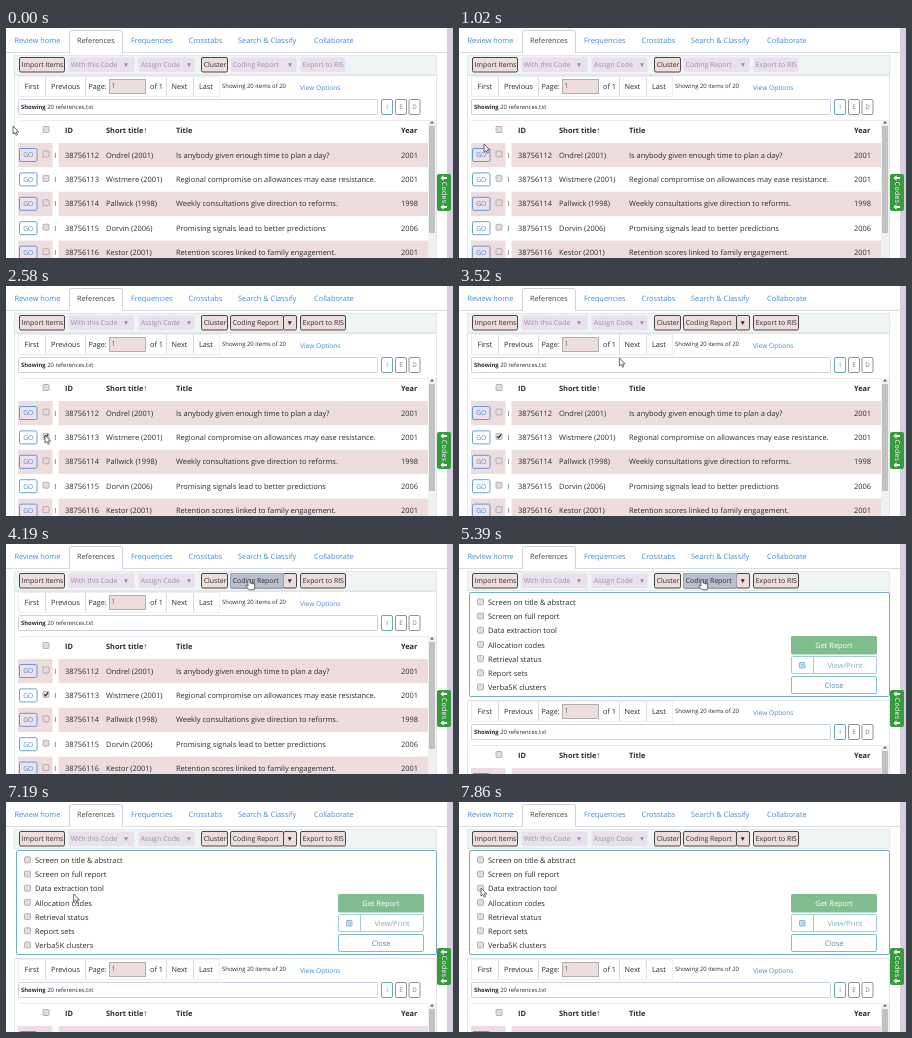
Animation, 447 px wide and 230 px high, one loop 8 s. Source, as an HTML page:

```html
<!DOCTYPE html>
<html lang="en">
<head>
<meta charset="utf-8">
<title>Reference list</title>
<style>
  html, body { margin: 0; width: 100%; height: 100%; overflow: hidden; background: #fff; }
  svg { display: block; width: 447px; height: 230px; }
  text { font-family: "Open Sans", "Noto Sans", sans-serif; text-rendering: geometricPrecision; white-space: pre; }
</style>
</head>
<body>
<svg id="stage" viewBox="0 0 447 230"></svg>
<script>
const INK = '#2b2b2e', EDGE = '#4a4648', BLUE = '#4487dc', PINK = '#eedddd', PALE = '#ebe0ee', MUTED = '#9b90a6', LINE = '#d9dbe0';
const LOOP = 8000, SHIFT = 109;

// Drawing helpers; text is placed by its vertical centre
const text = (x, y, s, size = 7.45, fill = INK, more = '') =>
  `<text x="${x}" y="${y + size * 0.35}" font-size="${size}" fill="${fill}" ${more}>${s}</text>`;
const mid = (x, y, s, size, fill, more = '') => text(x, y, s, size, fill, 'text-anchor="middle" ' + more);
const box = (x1, y1, x2, y2, fill, stroke = 'none', r = 0, more = '') =>
  `<rect x="${x1}" y="${y1}" width="${x2 - x1}" height="${y2 - y1}" fill="${fill}" stroke="${stroke}" rx="${r}" ${more}/>`;
const path = (d, fill, stroke = 'none', more = '') => `<path d="${d}" fill="${fill}" stroke="${stroke}" ${more}/>`;
const group = (id, inner, more = '') => `<g id="${id}" ${more}>${inner}</g>`;
const down = (x, fill) => path(`M${x - 2} 35.2h4l-2 3.8z`, fill);
const check = (x, y) => box(x - 3, y - 3, x + 3, y + 3, '#e5dae0', '#aba1ab', 1, 'stroke-width=".8"');
const tool = (x1, x2, label, on) =>
  box(x1 + .5, 29.5, x2 - .5, 44, on ? PINK : PALE, on ? EDGE : 'none', 1.5) +
  text(x1 + 2.7, 36.8, label, 6.9, on ? INK : MUTED);
const hover = (id, x1, x2, label) =>
  group(id, box(x1 + .5, 29.5, x2 - .5, 44, '#b8bfcf', '#9aa2b4', 1.5) + text(x1 + 2.7, 36.8, label, 6.9));

const tabs = [[8.5, 'Review home'], [125, 'Frequencies'], [182.5, 'Crosstabs'], [232, 'Search &amp; Classify'], [308, 'Collaborate']];
const frame =
  box(441, 0, 447, 230, '#d7cee1') +
  path('M0 24.5H441', 'none', LINE) +
  path('M63.5 25V4q0-1.5 1.5-1.5H115q1.5 0 1.5 1.5V25', '#fff', '#d0d2d8') +
  tabs.map(([x, s]) => text(x, 12.6, s, 7.4, BLUE)).join('') +
  text(71, 12.6, 'References', 7.3, '#444');

const toolbar =
  box(8.5, 27.5, 430.5, 46.5, '#eff4f4', '#e4e8e9') +
  tool(13, 59, 'Import Items', true) +
  tool(62, 129, 'With this Code', false) + down(120, MUTED) +
  tool(132, 189, 'Assign Code', false) + down(183, MUTED) +
  tool(195, 222, 'Cluster', true) +
  group('disabled', tool(224, 291, 'Coding Report', false) + down(284, MUTED) + tool(294, 340, 'Export to RIS', false)) +
  group('enabled', tool(277, 291, '', true) + down(283.7, INK) + tool(224, 278, 'Coding Report', true) + tool(294, 340, 'Export to RIS', true)) +
  hover('clusterHover', 195, 222, 'Cluster') +
  hover('reportHover', 224, 278, 'Coding Report');

const pager =
  box(12.5, 48.5, 213.5, 68.5, '#fff', '#eceef1') +
  path('M39.5 49V68M79.5 49V68M160.5 49V68M187.5 49V68', 'none', LINE) +
  text(18.5, 58, 'First', 7.3) + text(45, 58, 'Previous', 7.3) + text(82.5, 58, 'Page:', 7.2) +
  box(103.5, 51.5, 139.5, 65.5, PINK, '#b3aeb0') + text(105.5, 58, '1', 7, '#666') +
  text(144, 58, 'of 1', 7.3) + text(165.5, 58, 'Next', 7.3) + text(193, 58, 'Last', 7.3) +
  text(216, 57.5, 'Showing 20 items of 20', 5.95) + text(294, 59.5, 'View Options', 6.6, BLUE) +
  box(12.5, 71.5, 371.5, 86.5, '#fff', '#c9d3e3', 1) +
  text(15, 78.8, '<tspan font-weight="700">Showing</tspan> 20 references.txt', 5.9) +
  [[375, 'I', BLUE], [389, 'E', '#777'], [402.5, 'D', '#777']].map(([x, s, c]) =>
    box(x + .5, 71.5, x + 11.5, 86.5, '#fff', c, 1.5, 'stroke-width=".8"') + mid(x + 6, 79, s, 6.2, c)).join('');

const columns = [[59, 'ID'], [100, 'Short title<tspan font-weight="400" font-size="8.5">↑</tspan>'], [170, 'Title'], [395, 'Year']];
const records = [
  ['Ondrel', 2001, 'Is anybody given enough time to plan a day?'],
  ['Wistmere', 2001, 'Regional compromise on allowances may ease resistance.'],
  ['Pallwick', 1998, 'Weekly consultations give direction to reforms.'],
  ['Dorvin', 2006, 'Promising signals lead to better predictions'],
  ['Kestor', 2001, 'Retention scores linked to family engagement.']
];
const row = ([name, year, title], i) => {
  const y = 127 + i * 24.4;
  return box(12, y - 12, 422, y + 12.4, i % 2 ? '#fff' : PINK) + box(46.5, y - 12, 52.5, y + 12.4, '#fff') +
    box(13.5, y - 6.5, 31, y + 6.5, i % 2 ? '#fff' : '#eee2e6', BLUE, 1.5, 'stroke-width=".8"') + mid(22.2, y, 'GO', 6.7, BLUE) +
    check(40, y - 1) + text(48.3, y, 'I', 7.2, '#3c5a45') + text(59, y, 38756112 + i) +
    text(100, y, `${name} (${year})`) + text(170, y, title) + text(395, y, year);
};
const table =
  path('M12 92.5H422', 'none', '#ececef') + check(40, 101.5) +
  columns.map(([x, s]) => text(x, 102.7, s, 7.4, INK, 'font-weight="700"')).join('') +
  records.map(row).join('') +
  group('goHover', box(13, 120, 31, 134, BLUE, BLUE, 1.5) + mid(22, 127, 'GO', 6.7, '#fff')) +
  group('tick', path('M38.2 150.3l1.4 1.6 2.5-3.6', 'none', INK, 'stroke-width="1.2"')) +
  box(422, 92, 430, 232, '#f1f1f1') + path('M424 95.5h4l-2-2.6z', '#666') + box(423, 98, 429, 205, '#c0c2c3');
const listing = group('listing', box(8.5, 47.5, 430.5, 240, '#fff', '#e3e6e9') + pager + table);

const options = ['Screen on title &amp; abstract', 'Screen on full report', 'Data extraction tool', 'Allocation codes',
  'Retrieval status', 'Report sets', 'Verba5K clusters'];
const panel = group('panel',
  box(8, 47, 432, 154, '#fff') + box(10.5, 48.5, 430.5, 152.5, '#fff', '#73a9de', 1.5) +
  options.map((s, i) => check(21.5, 57.8 + i * 14.2) + text(29, 58.3 + i * 14.2, s, 7.5)).join('') +
  box(332, 92, 418, 110.5, '#80be90', 'none', 1.5) + mid(375, 101.3, 'Get Report', 7.4, '#fff') +
  box(332.5, 112.5, 417.5, 129.5, '#fff', '#a3cbe8', 1.5) + path('M354.5 112V130', 'none', '#a3cbe8') +
  box(340.5, 118.5, 346, 124, '#e3eff8', '#85b3d8', .5, 'stroke-width=".9"') + path('M342 118.5v2h3v-2M342 124v-2h3v2', 'none', '#85b3d8', 'stroke-width=".7"') +
  mid(386, 121, 'View/Print', 7.4, '#78add5') +
  box(332.5, 132.5, 417.5, 149.5, '#fff', '#7fbbdc', 1.5) + mid(375, 141, 'Close', 7.4, '#438bb5'));

const leftArrow = y => path(`M434.5 ${y}l3-2.7v1.8h3.5v1.8h-3.5v1.8z`, '#fff');
const codes = box(431, 146, 445, 183, '#379b3e', 'none', 2) + leftArrow(150) + leftArrow(179) +
  mid(0, 0, 'Codes', 7, '#fff', 'transform="translate(438 164.5) rotate(90)" letter-spacing=".25"');

const cursor = group('cursor',
  group('arrow', path('M0 0V9.2L2.2 7.3 3.7 10.6 5.2 9.9 3.8 6.8H6.6Z', '#fff', '#444', 'stroke-width=".9"'), 'transform="scale(.87)"') +
  group('hand', path('M-1 0Q0-1.8 1 0V3L5.2 4Q6 4.4 5.8 6.5L5 9.8H0L-3.4 5.8Q-3 4.3-1 6Z', '#fff', '#444', 'stroke-width=".8"')));

stage.innerHTML = frame + toolbar + listing + panel + codes + cursor;

// Pointer stops: time, x, y
const stops = [[0, 7, 98], [600, 7, 98], [1020, 25, 116], [1380, 35, 139], [1680, 39, 149], [2980, 39, 149],
  [3760, 214, 38], [4190, 243, 36], [6110, 243, 36], [6590, 196, 80.5], [6890, 97, 97], [7670, 21, 84],
  [7800, 21, 84], [7801, 22, 86], [LOOP, 22, 86]];
const el = id => document.getElementById(id);
const show = (id, on) => el(id).setAttribute('visibility', on ? 'visible' : 'hidden');
const clamp = v => Math.max(0, Math.min(1, v));
const during = (t, from, to) => t >= from && t < to;
const fade = (id, t, from, to) => el(id).setAttribute('opacity', Math.min(clamp((t - from) / 150), 1 - clamp((t - to) / 150)));

function pointer(t) {
  const i = stops.findIndex(s => s[0] > t);
  const [t0, x0, y0] = stops[i - 1], [t1, x1, y1] = stops[i];
  const k = (t - t0) / (t1 - t0);
  return [x0 + (x1 - x0) * k, y0 + (y1 - y0) * k];
}

function draw() {
  const t = performance.now() % LOOP;
  const open = t >= 5390, enabled = t >= 2400;
  const [x, y] = pointer(t);
  const hand = during(t, 1110, 1300) || during(t, 3720, 6230);
  el('cursor').setAttribute('transform', `translate(${x} ${y})`);
  el('listing').setAttribute('transform', `translate(0 ${open ? SHIFT : 0})`);
  show('hand', hand);
  show('arrow', !hand);
  show('panel', open);
  show('enabled', enabled);
  show('disabled', !enabled);
  show('tick', t >= 2340);
  fade('goHover', t, 1110, 1300);
  fade('clusterHover', t, 3700, 3850);
  fade('reportHover', t, 3900, 6200);
  requestAnimationFrame(draw);
}
draw();
</script>
</body>
</html>
```
